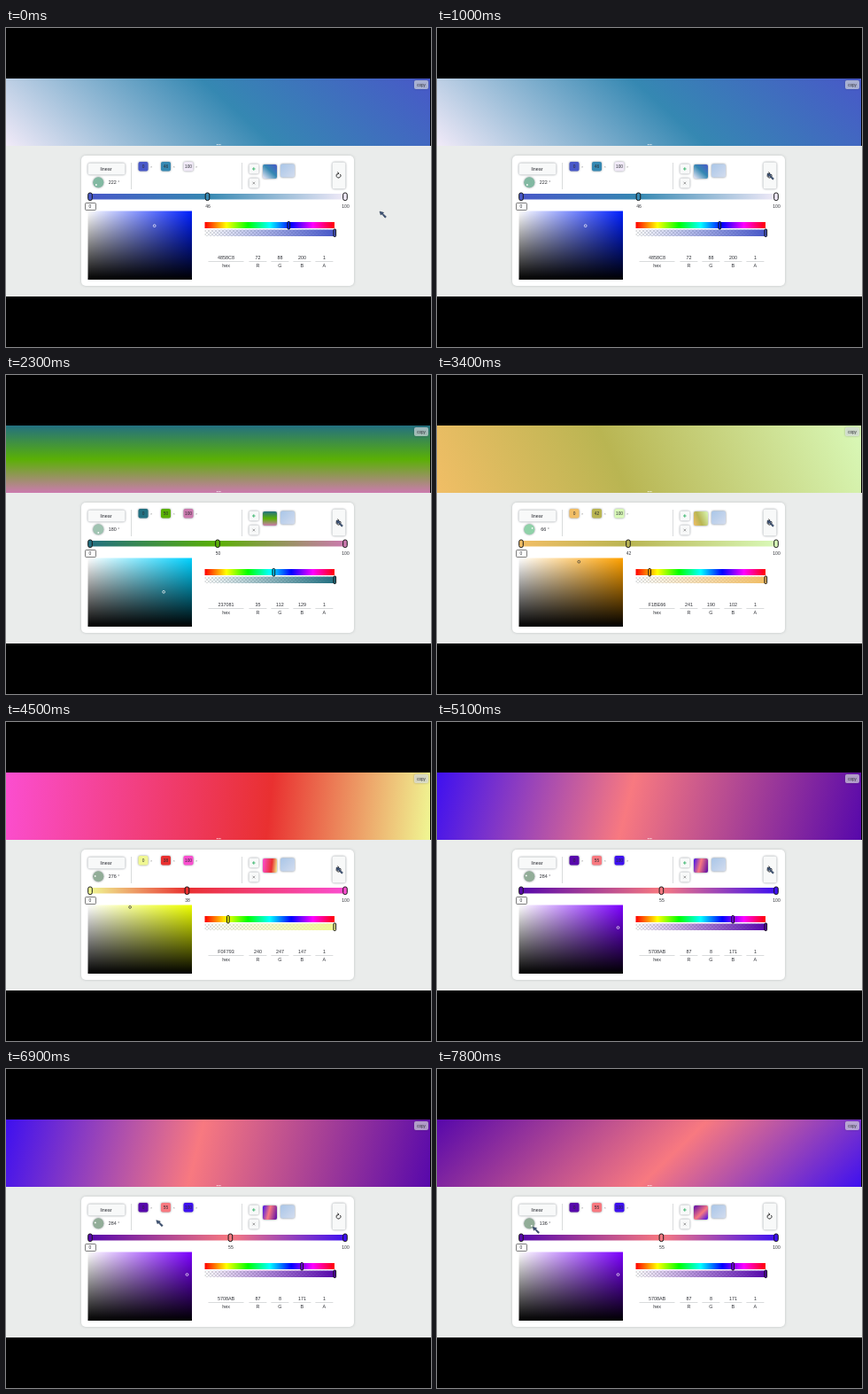
Animation, 480 px wide and 360 px high, one loop 8000 ms. Source, as an HTML page:

```html
<!DOCTYPE html>
<html lang="en">
<head>
<meta charset="utf-8">
<title>Gradient editor</title>
<style>
  html, body { margin: 0; width: 100%; height: 100%; overflow: hidden; background: #000; }
  svg { display: block; width: 100vw; height: 100vh; }
  text { font-family: "Liberation Sans", Arial, sans-serif; font-size: 5.4px; fill: #2b2d33; text-anchor: middle; }
  .soft { filter: drop-shadow(0.4px 0.8px 1.2px rgba(40, 50, 60, 0.55)); }
  .card { filter: drop-shadow(0 0 1.5px rgba(60, 70, 80, 0.25)); }
  .line { stroke: #c9cccd; stroke-width: 0.7; }
</style>
</head>
<body>
<svg id="stage" viewBox="0 0 480 360">
  <defs>
    <linearGradient id="banner" gradientUnits="userSpaceOnUse"></linearGradient>
    <linearGradient id="thumb" gradientUnits="userSpaceOnUse"></linearGradient>
    <linearGradient id="track"></linearGradient>
    <linearGradient id="hues"></linearGradient>
    <linearGradient id="sat"><stop stop-color="#fff"/><stop id="pure" offset="1"/></linearGradient>
    <linearGradient id="val" x2="0" y2="1"><stop stop-opacity="0"/><stop offset="1"/></linearGradient>
    <linearGradient id="fade"><stop id="fade0" stop-opacity="0"/><stop id="fade1" offset="1"/></linearGradient>
    <linearGradient id="pale" x2="1" y2="1"><stop stop-color="#a9c6e8"/><stop offset="1" stop-color="#d3dcee"/></linearGradient>
    <pattern id="check" width="4" height="4" patternUnits="userSpaceOnUse">
      <rect width="4" height="4" fill="#fff"/>
      <path d="M0 0h2v2h-2zM2 2h2v2h-2z" fill="#dcdedf"/>
    </pattern>
  </defs>

  <rect width="480" height="360"/>
  <rect y="133" width="480" height="170" fill="#eaeceb"/>
  <rect y="57" width="479" height="76" fill="url(#banner)"/>
  <g fill="#fff"><circle cx="238.4" cy="131.6" r=".6"/><circle cx="240.2" cy="131.6" r=".6"/><circle cx="242" cy="131.6" r=".6"/></g>
  <rect class="soft" x="461" y="59" width="16" height="10" rx="2" fill="#eef1f4" fill-opacity=".6"/>
  <text x="469" y="65.6" style="font-size:4.6px">copy</text>

  <rect class="card" x="85" y="144" width="308" height="147" rx="5" fill="#fff"/>
  <g class="soft" fill="#f8f9f9">
    <rect x="92.5" y="152.5" width="42" height="13" rx="2.5"/>
    <rect x="274.5" y="153.5" width="11" height="11" rx="2"/>
    <rect x="274.5" y="169.5" width="11" height="11" rx="2"/>
    <rect x="368.5" y="151.5" width="15" height="30" rx="2.5"/>
  </g>
  <text x="113" y="161">linear</text>
  <path class="line" d="M141.5 152V182M266.5 152V182"/>
  <path d="M278 159h3.6M279.8 157.200v3.600" stroke="#35b56a" stroke-width=".9"/>
  <path d="M278.500 173.700l2.700 2.700m0-2.700l-2.700 2.700" stroke="#777" stroke-width=".7"/>
  <path d="M374.700 164.200A2.500 2.500 0 1 0 377.500 165M374.300 162.700l1.800 1.400l-1.900 1.200" fill="none" stroke="#222" stroke-width=".9"/>

  <circle class="soft" id="knob" cx="104.300" cy="174.300" r="6"/>
  <circle id="dot" r=".9" fill="#fff"/>
  <text id="angle" x="122" y="176.300"></text>

  <rect class="soft" x="290" y="154" width="16" height="16" rx="2" fill="url(#thumb)"/>
  <rect class="soft" x="310" y="153.500" width="16" height="15" rx="2" fill="url(#pale)"/>
  <g id="chips"></g>

  <rect x="95" y="187" width="288" height="6.500" rx="1" fill="url(#track)"/>
  <rect x="89.500" y="197.500" width="12" height="8" rx="1" fill="#fff" stroke="#444" stroke-width=".7"/>
  <g id="handles"></g>

  <rect x="92.500" y="206.500" width="117.500" height="77.500" fill="url(#sat)"/>
  <rect x="92.500" y="206.500" width="117.500" height="77.500" fill="url(#val)"/>
  <circle id="pick" r="1.400" fill="none" stroke="#fff" stroke-width=".7"/>

  <rect x="224.500" y="219" width="146.500" height="7" fill="url(#hues)"/>
  <rect x="224.500" y="227.500" width="146.500" height="7.500" fill="url(#check)"/>
  <rect x="224.500" y="227.500" width="146.500" height="7.500" fill="url(#fade)"/>
  <g stroke="#111" stroke-width="1">
    <rect id="hue" y="218.500" width="2.600" height="8.500" rx="1"/>
    <rect id="alpha" x="370" y="227" width="2.600" height="8.500" rx="1"/>
  </g>
  <g id="fields"></g>

  <path id="cursor" d="M0 0L1.200 4L2.500 3.100L6.100 7.200L7.500 5.900L3.600 2.400L4.600 1.300Z" fill="#3d5275" stroke="#26364f" stroke-width=".5"/>
</svg>

<script>
const LOOP = 8000;
const $ = id => document.getElementById(id);
const put = (el, attrs) => { for (const k in attrs) el.setAttribute(k, attrs[k]); return el; };
const add = (parent, tag, attrs) =>
  parent.appendChild(put(document.createElementNS("http://www.w3.org/2000/svg", tag), attrs));

const scenes = [
  { at: 0,    colors: ["#4858C8", "#3588B2", "#F1EAF8"], mid: 46, angle: 222, knob: "#82b9a2" },
  { at: 1700, colors: ["#237081", "#5AB005", "#CC7AAF"], mid: 50, angle: 180, knob: "#9fc3b1" },
  { at: 2800, colors: ["#F1BE66", "#B9B552", "#D9F9B8"], mid: 42, angle: 66,  knob: "#90d2a9" },
  { at: 3900, colors: ["#F0F793", "#E93030", "#FB4ED0"], mid: 38, angle: 276, knob: "#92ad98" },
  { at: 5000, colors: ["#5708AB", "#F87980", "#3E10F0"], mid: 55, angle: 284, knob: "#92ad98" }
];
const drag = { from: 7500, to: 7800, end: 136 };
const KNOB = [104.3, 174.3];

for (const id of ["banner", "thumb", "track"])
  for (let i = 0; i < 3; i++) add($(id), "stop", {});
for (let i = 0; i <= 6; i++)
  add($("hues"), "stop", { offset: i / 6, "stop-color": `hsl(${i * 60},100%,50%)` });

const chips = [155, 180.500, 206].map(x => {
  const box = add($("chips"), "rect", { class: "soft", x: x - 5.5, y: 151, width: 11, height: 10.5, rx: 2 });
  const label = add($("chips"), "text", { x, y: 158, style: "font-size:4.8px" });
  add($("chips"), "text", { x: x + 9.2, y: 157.6, style: "font-size:4px;fill:#888" }).textContent = "×";
  return { box, label };
});
const handles = [0, 1, 2].map(() => ({
  box: add($("handles"), "rect", { y: 186, width: 4.6, height: 8.6, rx: 2.1, stroke: "#181818", "stroke-width": 1 }),
  label: add($("handles"), "text", { y: 203.4, style: "font-size:5px" })
}));
const fields = ["hex", "R", "G", "B", "A"].map((name, i) => {
  const x = i ? 259.4 + i * 25 : 248.5;
  const half = i ? 10 : 20;
  add($("fields"), "path", { class: "line", d: `M${x - half} 263.500h${half * 2}` });
  add($("fields"), "text", { x, y: 270 }).textContent = name;
  return add($("fields"), "text", { x, y: 261 });
});

function toHsv([r, g, b]) {
  const max = Math.max(r, g, b), d = max - Math.min(r, g, b);
  const h = max === r ? (g - b) / d + 6 : max === g ? (b - r) / d + 2 : (r - g) / d + 4;
  return [h % 6 * 60, d / max, max / 255];
}

// Same geometry as a CSS linear-gradient at the given angle.
function aim(id, x, y, w, h, angle) {
  const a = angle * Math.PI / 180, s = Math.sin(a), c = -Math.cos(a);
  const half = (Math.abs(w * s) + Math.abs(h * c)) / 2;
  const cx = x + w / 2, cy = y + h / 2;
  put($(id), { x1: cx - s * half, y1: cy - c * half, x2: cx + s * half, y2: cy + c * half });
}

function showScene(s) {
  const stops = [0, s.mid, 100];
  s.colors.forEach((color, i) => {
    for (const id of ["banner", "thumb", "track"])
      put($(id).children[i], { offset: stops[i] / 100, "stop-color": color });
    const x = 95 + stops[i] * 2.88;
    put(chips[i].box, { fill: color });
    put(handles[i].box, { x: x - 2.3, fill: color });
    put(handles[i].label, { x: x + (i ? 0.5 : 0) });
    chips[i].label.textContent = handles[i].label.textContent = stops[i];
  });

  const base = s.colors[0];
  const rgb = [1, 3, 5].map(i => parseInt(base.slice(i, i + 2), 16));
  const [h, sat, val] = toHsv(rgb);
  put($("pure"), { "stop-color": `hsl(${h},100%,50%)` });
  put($("pick"), { cx: 92.5 + sat * 117.5, cy: 206.5 + (1 - val) * 77.5, stroke: val > 0.9 ? "#333" : "#fff" });
  put($("hue"), { x: 223.4 + h / 360 * 146.5, fill: `hsl(${h},100%,50%)` });
  put($("alpha"), { fill: base });
  put($("fade0"), { "stop-color": base });
  put($("fade1"), { "stop-color": base });
  put($("knob"), { fill: s.knob });
  [base.slice(1), ...rgb, 1].forEach((v, i) => { fields[i].textContent = v; });
}

function onKnob(angle, r) {
  const a = angle * Math.PI / 180;
  return [KNOB[0] + r * Math.sin(a), KNOB[1] - r * Math.cos(a)];
}

const part = (t, a, b) => Math.min(1, Math.max(0, (t - a) / (b - a)));
const ease = p => p * p * (3 - 2 * p);
const mix = (a, b, p) => a.map((v, i) => v + (b[i] - v) * p);

function cursorAt(t, angle) {
  const button = [373, 164];
  if (t < 5900) return mix([422, 207], button, ease(part(t, 50, 850)));
  return mix(button, onKnob(angle, 5.5), ease(part(t, 5900, 7400)));
}

let shown = null;
function render(t) {
  const scene = scenes.filter(s => s.at <= t).pop();
  if (scene !== shown) showScene(shown = scene);
  const turn = part(t, drag.from, drag.to);
  const angle = Math.round(scene.angle + (drag.end - scene.angle) * turn);
  aim("banner", 0, 57, 479, 76, angle);
  aim("thumb", 290, 154, 16, 16, angle);
  const [cx, cy] = onKnob(angle, 3.6);
  put($("dot"), { cx, cy });
  $("angle").textContent = angle + " °";
  put($("cursor"), { transform: `translate(${cursorAt(t, angle)})` });
}

const start = performance.now();
function tick() {
  render((performance.now() - start) % LOOP);
  requestAnimationFrame(tick);
}
tick();
</script>
</body>
</html>
```
